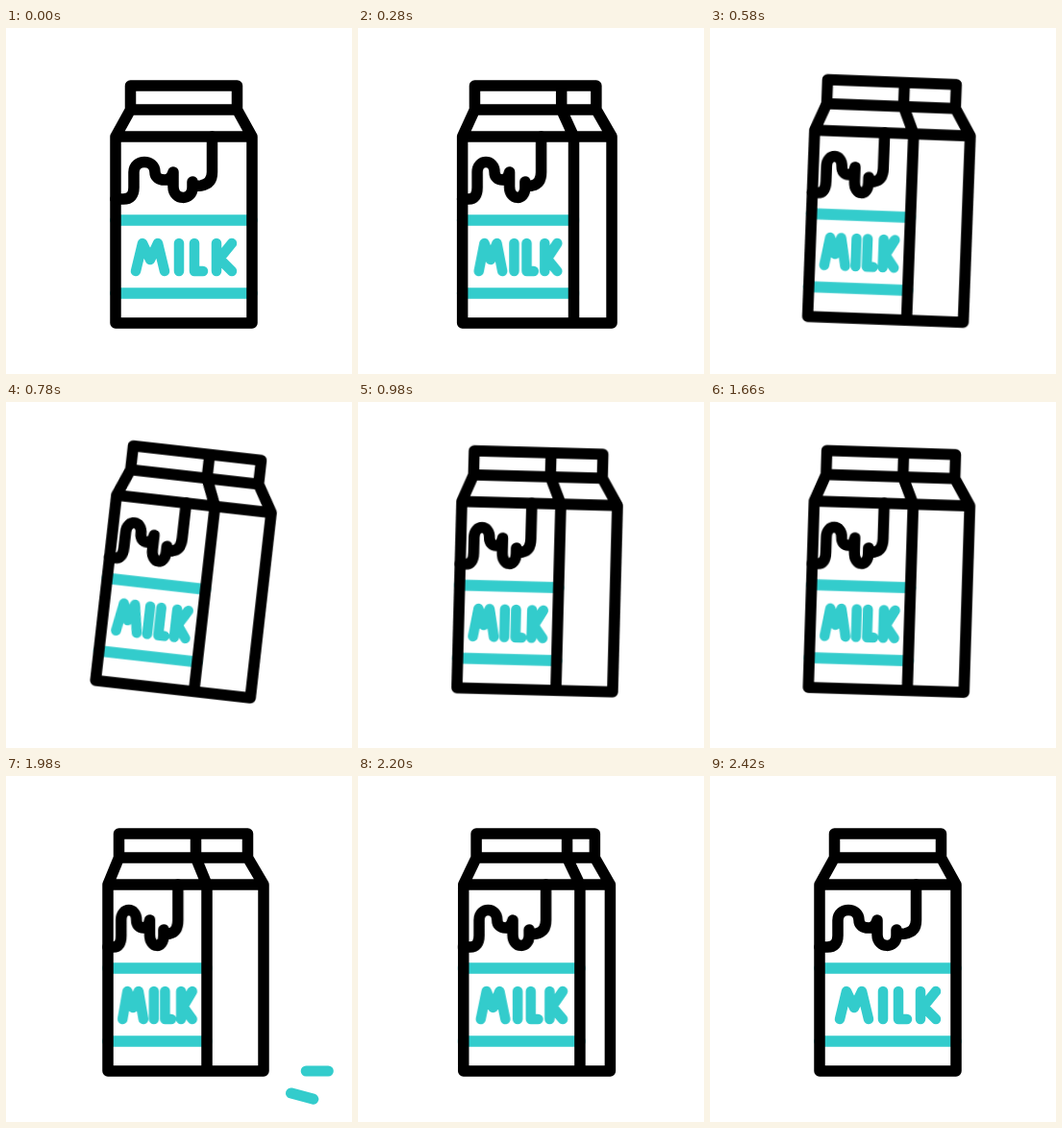
These frames come from a looping animation (360x360 px, 2620 ms). An HTML page without scripts:

```html
<!DOCTYPE html>
<html lang="en">
<head>
<meta charset="utf-8">
<title>Milk carton</title>
<style>
  html, body { margin: 0; width: 100%; height: 100%; overflow: hidden; background: #fff; }
  svg { display: block; width: 100%; height: 100%; }

  path {
    fill: none;
    stroke: #000;
    stroke-width: 11.5;
    stroke-linecap: round;
    stroke-linejoin: round;
  }
  .teal { stroke: #3cc; }
  .lettering { stroke-width: 10.5; }
  .face path { vector-effect: non-scaling-stroke; }

  .carton, .shell, .face, .mark { animation: 2620ms cubic-bezier(.37, 0, .63, 1) infinite; }
  .carton { transform-origin: 187px 189px; animation-name: tilt, hop; }
  .shell { animation-name: turn-shell; }
  .face { animation-name: turn-face; }
  .mark {
    stroke-width: 11;
    stroke-dasharray: 44 200;
    animation-name: dash;
    animation-timing-function: linear;
  }

  @keyframes tilt {
    0%, 16.8% { rotate: 0deg; }
    30.5% { rotate: 6.5deg; }
    45% { rotate: -4.2deg; }
    61.1% { rotate: 2deg; }
    72.5%, 100% { rotate: 0deg; }
  }
  @keyframes hop {
    0%, 17.2% { translate: 0 0; }
    27.1%, 63.4% { translate: 0 -7.4px; }
    71.8%, 100% { translate: 0 0; }
  }

  /* Front view swings open to show the side panel */
  @keyframes turn-shell {
    0%, 92.4%, 100% {
      d: path("M129.5 60H240.5V85L256 113V307H114V113L129.5 85ZM129.5 85H240.5M114 113H256M240.5 60V85L256 113V307");
    }
    17.6%, 76.3% {
      d: path("M117.5 60H251.5V85L268 113V307H106V113L117.5 85ZM117.5 85H251.5M106 113H268M197.5 60V85L209 113V307");
    }
  }
  @keyframes turn-face {
    0%, 92.4%, 100% { transform: translateX(114px) scaleX(1) translateX(-114px); }
    17.6%, 76.3% { transform: translateX(106px) scaleX(.725) translateX(-114px); }
  }

  /* Landing marks */
  @keyframes dash {
    0%, 70.2% { stroke-dashoffset: 45; }
    78.2%, 100% { stroke-dashoffset: -101; }
  }
</style>
</head>
<body>
<svg viewBox="0 0 360 360" role="img" aria-label="Carton of MILK">
  <g class="carton">
    <g class="face">
      <path class="teal" d="M114 200H256M114 276H256"/>
      <path class="teal lettering" d="M135 253L142 224L150 241L158 224L165 253
        M180 224V253 M196 224V253H205 M219 224V253M235 224L222 240L235 253"/>
      <path d="M114 178H122Q133 178 133 166V150C133 136 155 136 155 150
        C155 155 159 158 165 158Q172 158 174 150V165
        C174 180 194 180 194 166V160Q195 165 203 164Q214.5 162 214.5 150V113"/>
    </g>
    <path class="shell" d="M129.5 60H240.5V85L256 113V307H114V113L129.5 85ZM129.5 85H240.5M114 113H256M240.5 60V85L256 113V307"/>
  </g>
  <path class="teal mark" pathLength="100" d="M284 307H336.5"/>
  <path class="teal mark" pathLength="100" d="M268 322.3L321 336.5"/>
</svg>
</body>
</html>
```
